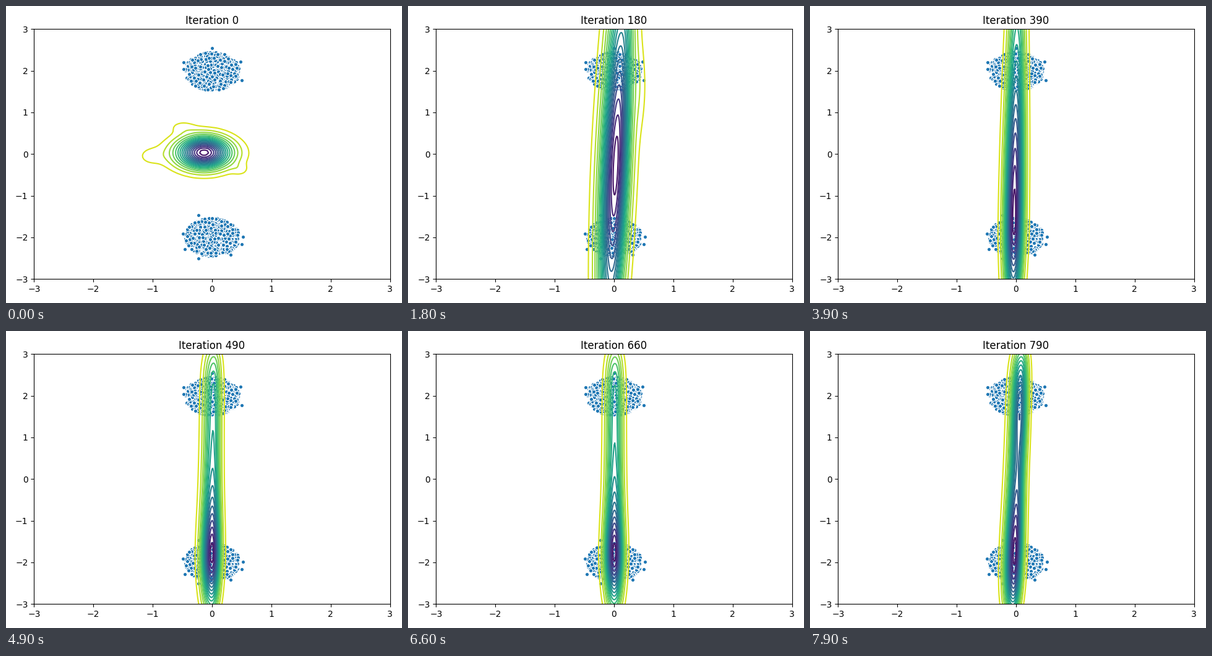
These frames come from a looping animation (640 px wide and 480 px high, 8000 ms). A matplotlib script:

```python
import numpy as np
import matplotlib.pyplot as plt
from matplotlib.animation import FuncAnimation

FRAMES, INTERVAL = 80, 100
STEP, TOP = 0.057, 18
LEVELS = STEP * np.arange(1, TOP)

# Starting blob: amplitude, centre x, y, spread x, y
BLOB = [
    (1.00, -0.13, 0.04, 0.27, 0.25),
    (0.30, -0.16, 0.02, 0.42, 0.28),
    (0.08, -0.50, 0.66, 0.16, 0.11),
    (0.07, 0.48, -0.38, 0.10, 0.10),
    (0.08, -1.05, -0.05, 0.15, 0.15),
]

# Ridge poses: time, peak y, length down and up, plateau, centre x, lean,
# width left and right, side bump x and amplitude
POSES = np.array([
    (10, -0.13, 2.30, 2.34, 0.00, 0.090, 0.052, 0.200, 0.165, 0.56, 0.050),
    (27, -0.45, 3.30, 3.33, 0.00, -0.020, 0.003, 0.108, 0.112, 0.32, 0.050),
    (39, -1.60, 1.34, 3.05, 0.00, -0.015, 0.010, 0.100, 0.095, 0.30, 0.000),
    (49, -1.83, 0.60, 0.84, 0.42, 0.010, 0.006, 0.105, 0.085, 0.25, 0.000),
    (66, -1.80, 0.58, 0.75, 0.42, 0.010, 0.002, 0.098, 0.090, 0.20, 0.000),
    (79, -1.80, 0.90, 0.90, 0.60, 0.020, 0.024, 0.098, 0.080, 0.07, 0.120),
])
TIMES = POSES[:, 0]

# Centre and size of the blob and of the first ridge, for stretching one into the other
MID_A, MID_B = np.array([-.13, .04]), np.array([.08, -.13])
SIZE_A, SIZE_B = np.array([.30, .26]), np.array([.18, 1.6])

STRAYS = [(0, 2.54), (-.48, 2.21), (-.48, 2.04), (.48, 2.22), (.50, 1.77),
          (.52, -1.98), (.50, -2.16), (-.49, -1.91), (-.46, -2.28),
          (-.23, -1.47), (-.23, -2.50), (.31, -2.41)]

X, Y = np.meshgrid(np.linspace(-1.4, 1.0, 220), np.linspace(-3.05, 3.05, 120))


def gauss(x, y, amp, cx, cy, sx, sy):
    return amp * np.exp(-0.5 * (((x - cx) / sx)**2 + ((y - cy) / sy)**2))


def bell(u, n):
    """Bell curve whose tails get heavier as n gets smaller."""
    return (1 + u**2 / (2 * n))**-n


def blob(x, y):
    z = sum(gauss(x, y, *g) for g in BLOB)
    return z / z.max()


def ridge(t, x, y):
    peak, down, up, flat, mid, lean, left, right, bump_x, bump = (
        np.interp(t, TIMES, col) for col in POSES.T[1:])
    along = bell((y - peak) / np.where(y < peak, down, up), 2)
    height = (1 - flat) * along + flat * np.exp(-(y / 3.1)**8)
    dx = x - mid - lean * np.clip(y, -3, 3)
    z = height * bell(dx / np.where(dx < 0, left, right), 6)
    z = z + gauss(x, y, bump, bump_x, 1.6, .08, .7)
    return z / z.max()


def density(i):
    if i >= TIMES[0]:
        return ridge(i, X, Y)
    e = i / TIMES[0]
    mid = MID_A + (MID_B - MID_A) * e
    size = SIZE_A * (SIZE_B / SIZE_A)**e
    u, v = (X - mid[0]) / size[0], (Y - mid[1]) / size[1]
    a = blob(u * SIZE_A[0] + MID_A[0], v * SIZE_A[1] + MID_A[1])
    b = ridge(TIMES[0], u * SIZE_B[0] + MID_B[0], v * SIZE_B[1] + MID_B[1])
    z = (1 - e) * a + e * b
    return z / z.max()


def cluster(rng, cy, count=750, radius=0.46):
    r = radius * rng.random(count)**0.55
    a = rng.uniform(0, 2 * np.pi, count)
    return np.column_stack([r * np.cos(a), cy + r * np.sin(a)])


rng = np.random.default_rng(4)
points = np.vstack([cluster(rng, 1.99), cluster(rng, -1.99), STRAYS])

fig, ax = plt.subplots(figsize=(6.4, 4.8), dpi=100)
ax.scatter(*points.T, s=20, color="#1f77b4", edgecolors="white", linewidths=0.8)
ax.set(xlim=(-3, 3), ylim=(-3, 3))
ax.set_title("Iteration 0")
fig.tight_layout()


def update(i):
    for old in list(ax.collections[1:]):
        old.remove()
    ax.contour(X, Y, density(i), levels=LEVELS, cmap="viridis_r",
               vmin=0, vmax=STEP * TOP, linewidths=1.5)
    ax.set(xlim=(-3, 3), ylim=(-3, 3))
    ax.set_title(f"Iteration {i * 10}")
    return []


anim = FuncAnimation(fig, update, frames=FRAMES, interval=INTERVAL,
                     repeat=True, repeat_delay=0, blit=False)
plt.show()
```
